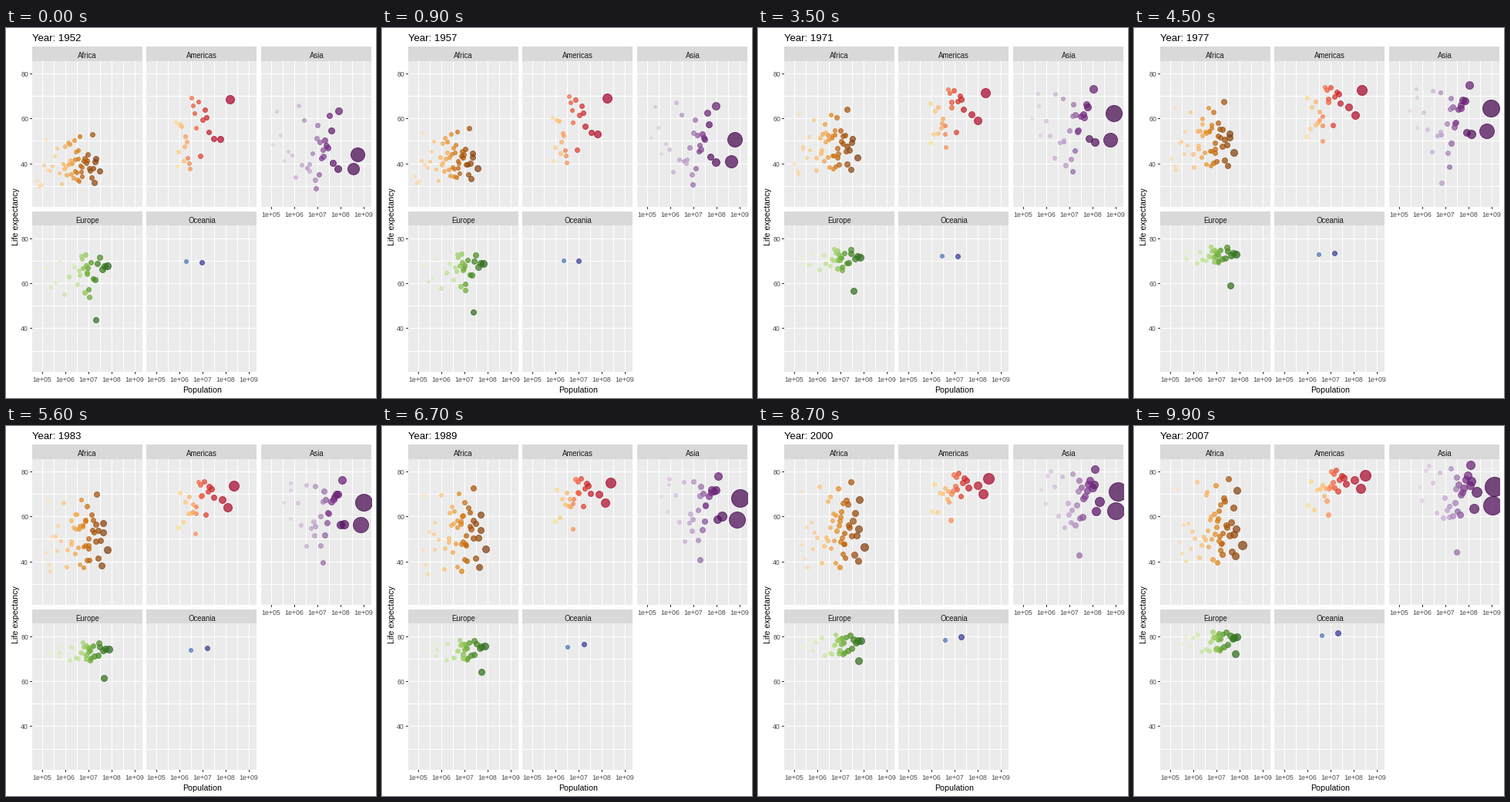
Recreate the animation shown at these times as a matplotlib script. Size 480 px wide and 480 px high, loop 10 s.

```python
import numpy as np
import matplotlib.pyplot as plt
from matplotlib.animation import FuncAnimation
from matplotlib.colors import LinearSegmentedColormap
from matplotlib.patches import Rectangle

plt.rcParams["font.family"] = "Liberation Sans"

SIZE, FRAMES = 480, 100
LEFT, TOP = 34.0, 24.3
PANEL_W, PANEL_H, STRIP_H, GAP = 143.2, 189.45, 18.8, 5.5
POP_MIN, POP_MAX = 0.06, 1319
LOG_LO, LOG_HI = 4.561, 9.337
LIFE_LO, LIFE_HI = 20.65, 85.55
YEARS = np.linspace(1952, 2007, FRAMES)
LIFE_YEARS = (1952, 1977, 1992, 2007)
QUARTILES = np.linspace(0, 1, 5)

rng = np.random.default_rng(7)


def crowd(n, pop_first, pop_last, *life):
    """n countries scattered over quartiles of log population and life."""
    def ranks(score):
        return np.argsort(np.argsort(score)) / (n - 1)

    progress = (YEARS[:, None] - 1952) / 55
    size_last = np.linspace(1, 0, n)
    size_first = ranks(size_last + rng.normal(0, 0.05, n))
    logpop = (np.interp(size_first, QUARTILES, pop_first) * (1 - progress)
              + np.interp(size_last, QUARTILES, pop_last) * progress)

    rank_first = ranks(rng.random(n))
    rank_last = ranks(rank_first + rng.normal(0, 0.2, n))
    by_year = [np.interp(rank_first + (rank_last - rank_first) * (y - 1952) / 55,
                         QUARTILES, q) for y, q in zip(LIFE_YEARS, life)]
    years = np.array([np.interp(YEARS, LIFE_YEARS, v) for v in np.transpose(by_year)])
    return logpop, years.T


def leader(keys):
    """One prominent country from {year: (millions, life expectancy)}."""
    millions, life = zip(*keys.values())
    years = list(keys)
    return (np.interp(YEARS, years, np.log10(millions) + 6)[:, None],
            np.interp(YEARS, years, life)[:, None])


panels = [
    ("Africa", 0, 0, "#7F3B08 #B35806 #E08214 #FDB863 #FEE0B6", [
        leader({1952: (22.2, 41.9), 1977: (38.8, 53.3), 2007: (80.3, 71.3)}),
        leader({1952: (33.1, 36.3), 1977: (62.2, 44.5), 2007: (135, 46.9)}),
        crowd(50, (4.78, 5.95, 6.42, 6.75, 7.32), (5.3, 6.5, 7.0, 7.28, 7.88),
              (30, 35.7, 38.8, 42.1, 52.7), (36.8, 44, 49.2, 55, 67.1),
              (33, 47, 52.4, 60, 73.6), (39.6, 47.9, 52.9, 59.4, 76.4))]),
    ("Americas", 1, 0, "#A50026 #D73027 #F46D43 #FDAE61 #FEE090", [
        leader({1952: (56.6, 50.9), 1977: (114, 61.5), 2007: (190, 72.4)}),
        leader({1952: (30.1, 50.8), 1977: (63.8, 65), 2007: (109, 76.2)}),
        leader({1952: (158, 68.4), 1972: (210, 71.3), 2007: (301, 78.2)}),
        crowd(22, (5.82, 6.19, 6.43, 6.79, 7.25), (6.03, 6.7, 6.96, 7.2, 7.65),
              (37.6, 43.5, 55, 60, 68.8), (49.9, 57.5, 66, 70, 74.2),
              (55.1, 66.8, 70, 73, 77.9), (60.9, 71.4, 73, 76, 80.7))]),
    ("Asia", 2, 0, "#40004B #762A83 #9970AB #C2A5CF #E7D4E8", [
        leader({1952: (8.43, 28.8), 1977: (14.9, 38.4), 2007: (31.9, 43.8)}),
        leader({1952: (4.69, 39.4), 1967: (6.96, 45.4), 1977: (6.98, 31.2),
                1982: (7.27, 51), 2007: (14.1, 59.7)}),
        leader({1952: (556, 44), 1957: (637, 50.5), 1962: (666, 44.5),
                1972: (862, 63.1), 2007: (1319, 73)}),
        leader({1952: (372, 37.4), 1977: (634, 54.2), 2007: (1110, 64.7)}),
        leader({1952: (82.1, 37.5), 1977: (137, 52.7), 2007: (224, 70.7)}),
        leader({1952: (86.5, 63), 1972: (107, 73.4), 2007: (127, 82.6)}),
        crowd(27, (5.08, 6.15, 6.9, 7.25, 7.67), (5.85, 6.85, 7.42, 7.68, 8.23),
              (32.5, 41, 46, 51.5, 65.4), (44, 54.5, 61, 67, 73.6),
              (49, 60.8, 69.2, 72.5, 77.6), (59.5, 64, 72, 75.6, 82.2))]),
    ("Europe", 0, 1, "#276419 #4D9221 #7FBC41 #B8E186 #E6F5D0", [
        leader({1952: (69.1, 67.5), 1977: (78.2, 72.5), 2007: (82.4, 79.4)}),
        leader({1952: (22.2, 43.6), 1972: (37.5, 57), 1987: (52.9, 63.1),
                2007: (71.2, 71.8)}),
        crowd(28, (5.17, 6.55, 6.86, 7.05, 7.7), (5.48, 6.7, 7.0, 7.2, 7.79),
              (53.8, 61.3, 65.9, 68, 72.7), (68.9, 70.5, 72.2, 73.8, 76.1),
              (69.4, 71, 75, 76.5, 78.8), (73, 75, 78.6, 79.8, 81.8))]),
    ("Oceania", 1, 1, "#313695 #4575B4", [
        leader({1952: (8.69, 69.1), 1972: (13.2, 71.9), 2007: (20.4, 81.2)}),
        leader({1952: (1.99, 69.4), 1972: (2.93, 71.9), 1987: (3.3, 74.3),
                2007: (4.12, 80.2)})]),
]

fig = plt.figure(figsize=(SIZE / 72, SIZE / 72), dpi=72, facecolor="white")
ax = fig.add_axes([0, 0, 1, 1])
ax.set(xlim=(0, SIZE), ylim=(SIZE, 0))
ax.axis("off")


def box(x, y, w, h, color):
    ax.add_patch(Rectangle((x, y), w, h, fc=color, lw=0))


def label(x, y, text, size=8.8, color="#4D4D4D", ha="center", rotation=0):
    return ax.text(x, y, text, size=size, color=color, ha=ha, va="baseline",
                   rotation=rotation, rotation_mode="anchor")


def x_at(logpop, x0):
    return x0 + (logpop - LOG_LO) / (LOG_HI - LOG_LO) * PANEL_W


def y_at(life, top):
    return top + (LIFE_HI - life) / (LIFE_HI - LIFE_LO) * PANEL_H


def draw_panel(name, x0, y0, bottom_axis):
    top = y0 + STRIP_H
    left, right = int(x0), int(x0 + PANEL_W)
    roof, floor = int(top), int(top + PANEL_H)
    box(left, int(y0), right - left, roof - int(y0), "#D9D9D9")
    box(left, roof, right - left, floor - roof, "#EBEBEB")
    label(x0 + PANEL_W / 2, int(y0) + 15, name, 9.6, "#1A1A1A")
    for life in range(30, 81, 10):
        y = int(y_at(life, top))
        box(left, y, right - left, 1, "white")
        if x0 == LEFT and life % 20 == 0:
            box(left - 3, y, 3, 1, "#333333")
            label(29, y + 4, str(life), ha="right")
    for half in range(10, 19):
        x = int(x_at(half / 2, x0))
        box(x, roof, 1, floor - roof, "white")
        if bottom_axis and half % 2 == 0:
            box(x, floor, 1, 3, "#333333")
            label(x, floor + 13, f"1e+{half // 2:02d}")


def tracks(parts, x0, top):
    """Whole-pixel centres and diameters, each shaped (frames, countries)."""
    logpop, life = (np.hstack(p) for p in zip(*parts))
    share = (10 ** (logpop - 6) - POP_MIN) / (POP_MAX - POP_MIN)
    size = 2 + 10 * np.sqrt(np.clip(share, 0, 1))
    diam = np.floor(0.75 * (size * 2.845 + 0.945) + 0.5)
    shift = diam / 2 - diam // 2
    x = np.floor(x_at(logpop, x0)) + shift
    y = np.floor(y_at(life, top)) + shift
    return np.stack([x, y], axis=-1), diam, logpop[-1]


def shades(ramp, final):
    """Darkest for the largest final population."""
    rank = np.argsort(np.argsort(-final))
    cmap = LinearSegmentedColormap.from_list("ramp", ramp.split(), N=1024)
    return cmap(rank / (len(final) - 1), alpha=0.7)


clouds = []
for name, col, row, ramp, parts in panels:
    x0 = LEFT + col * (PANEL_W + GAP)
    y0 = TOP + row * (STRIP_H + PANEL_H + GAP)
    top = y0 + STRIP_H
    draw_panel(name, x0, y0, bottom_axis=row == 1 or col == 2)
    centres, diam, final = tracks(parts, x0, top)
    colors = shades(ramp, final)
    dots = ax.scatter(*centres[0].T, s=(diam[0] - 1) ** 2, facecolors=colors,
                      edgecolors=colors, linewidths=1, zorder=4)
    dots.set_clip_path(Rectangle((int(x0), int(top)), int(PANEL_W) + 1,
                                 int(PANEL_H) + 1, transform=ax.transData))
    clouds.append((dots, centres, diam))

label(LEFT + 1.5 * PANEL_W + GAP, 473, "Population", 10.6, "black")
label(15.5, 244.7, "Life expectancy", 10.6, "black", rotation=90)
title = label(LEFT, 17, "", 13.2, "black", ha="left")


def update(i):
    title.set_text(f"Year: {round(YEARS[i])}")
    for dots, centres, diam in clouds:
        dots.set_offsets(centres[i])
        dots.set_sizes((diam[i] - 1) ** 2)
    return [title] + [c[0] for c in clouds]


anim = FuncAnimation(fig, update, frames=FRAMES, interval=100, repeat=True,
                     repeat_delay=0, blit=False)
plt.show()
```
